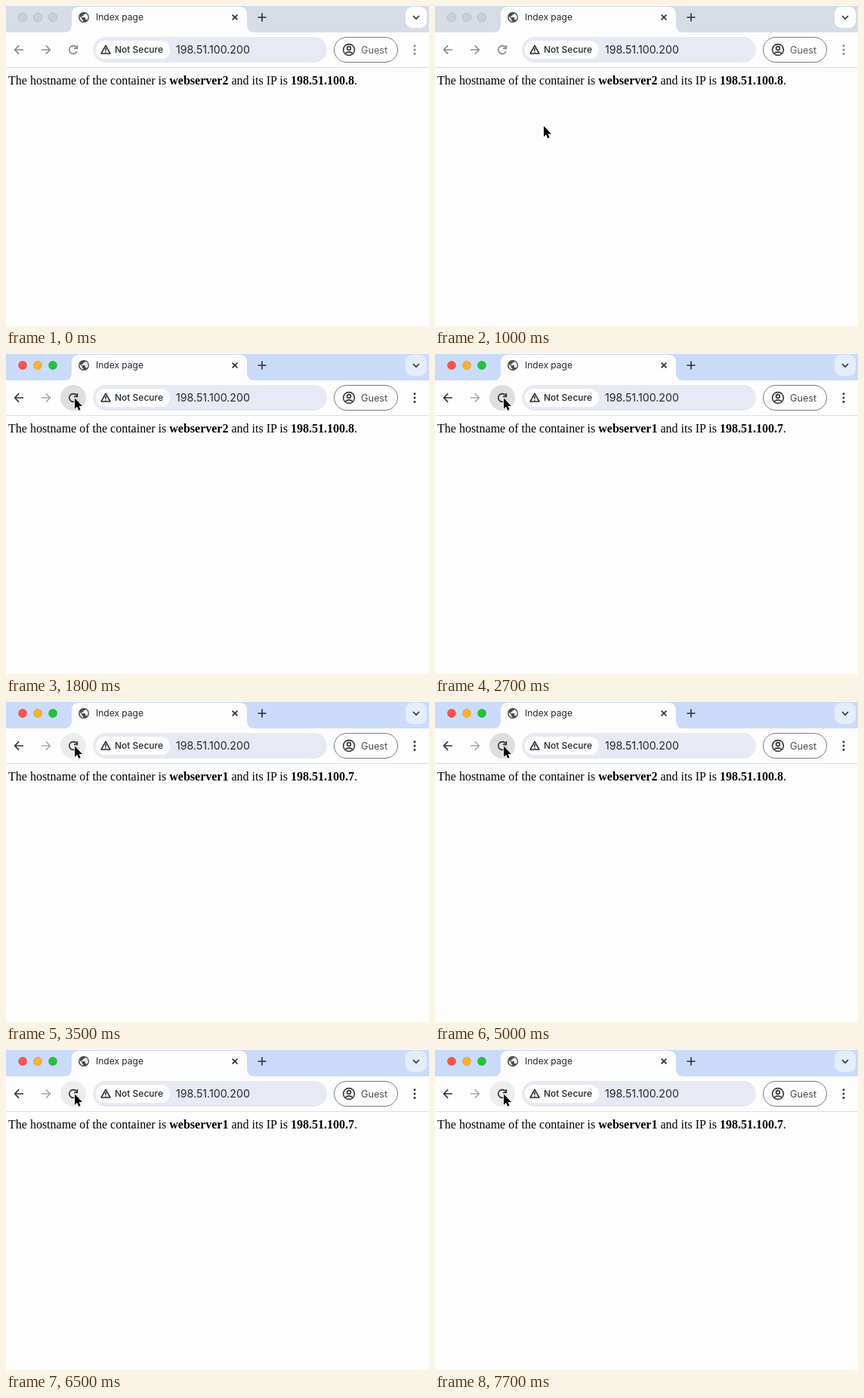
Animation, 560 px wide and 424 px high, one loop 8 s. Source, as an HTML page:

```html
<!DOCTYPE html>
<html lang="en">
<head>
<meta charset="utf-8">
<title>Index page</title>
<style>
  html, body { margin: 0; width: 100%; height: 100%; overflow: hidden; background: #fdfdfd; }
  svg {
    display: block; width: 560px; height: 424px;
    --strip: #d6dde6; --menu: #fefefe; --icon: #85888c; --faded: #8c8f93; --guest: #5b5e62;
    --red: #ccd0d5; --amber: #ccd0d5; --green: #ccd0d5; --rim: #b4b8be;
  }
  svg.active {
    --strip: #cbdcfb; --menu: #e5edfd; --icon: #303337; --faded: #a7a9ac; --guest: #484b4f;
    --red: #ff5148; --amber: #ffb02a; --green: #22c23a; --rim: rgba(0, 0, 0, .12);
  }
  .line { fill: none; stroke-width: 1.6; }
  .icon { stroke: var(--icon); }
  .faded { stroke: var(--faded); }
  .dark { stroke: #2b2e32; }
  .ui { font-family: Inter, Roboto, sans-serif; fill: #24272b; }
  .page { font: 16px "Liberation Serif", "Times New Roman", serif; fill: #000; }
  .bold { font-weight: 700; }
</style>
</head>
<body>
<svg id="stage" viewBox="0 0 560 424">
  <rect width="560" height="424" fill="#fdfdfd"/>

  <!-- Tab strip -->
  <rect width="560" height="35" fill="var(--strip)"/>
  <path d="M77 35Q87 35 87 25V11Q87 1 97 1H309Q319 1 319 11V25Q319 35 329 35Z" fill="#fdfdfd"/>
  <g stroke="var(--rim)" stroke-width=".8">
    <circle cx="22" cy="15" r="5.7" fill="var(--red)"/>
    <circle cx="42" cy="15" r="5.7" fill="var(--amber)"/>
    <circle cx="62" cy="15" r="5.7" fill="var(--green)"/>
  </g>
  <circle cx="103" cy="15" r="7" fill="#4b4e53"/>
  <g fill="#fdfdfd">
    <path d="M97.6 13.6L101 17V18Q101 19.2 102.3 19.3V20.6Q97 19.5 97.6 13.6Z"/>
    <path d="M105 9.8Q108.6 11.6 108.6 15Q108.6 17.2 107.1 18.8Q106.7 17.8 105.6 17.8H105V15.7Q105 15 104.3 15H100.2V13.6H101.6Q102.3 13.6 102.3 12.9V11.5H103.6Q105 11.4 105 9.8Z"/>
  </g>
  <text class="ui" x="119" y="19.2" font-size="12">Index page</text>
  <path class="line dark" d="M299.6 11.6l6.8 6.8m0-6.8l-6.8 6.8"/>
  <path class="line dark" d="M333.5 15h11M339 9.5v11"/>
  <rect x="529" y="1" width="28" height="28" rx="9" fill="var(--menu)"/>
  <path class="line dark" stroke-width="1.8" d="M539 13l4 4 4-4"/>

  <!-- Toolbar -->
  <path d="M0 81.5H560" stroke="#dcdfe4"/>
  <path class="line icon" d="M23 58H12M17.2 52.4L11.6 58l5.6 5.6"/>
  <path class="line faded" d="M47 58H58M52.8 52.4L58.4 58l-5.6 5.6"/>
  <circle id="hover" cx="89" cy="58" r="17"/>
  <path class="line icon" d="M94 60.2A5.4 5.4 0 1 1 93.2 54.5L94.4 56"/>
  <path class="line icon" d="M94.4 52v4.4H90"/>

  <rect x="115" y="41" width="310" height="34" rx="17" fill="#e7eaf5"/>
  <rect x="119" y="46" width="98" height="24" rx="12" fill="#fdfdfd"/>
  <path class="line dark" stroke-width="1.4" stroke-linejoin="round" d="M132 52.3L137.9 63H126.1Z"/>
  <path class="line dark" stroke-width="1.4" d="M132 55.8v3.6m0 1v1.4"/>
  <text class="ui" x="144" y="62.2" font-size="12" font-weight="500">Not Secure</text>
  <text class="ui" x="225" y="63" font-size="14.2">198.51.100.200</text>

  <rect x="434.5" y="41.5" width="84" height="33" rx="16.5" fill="#fdfdfd" stroke="#76797c"/>
  <g class="line" stroke="#34373b" stroke-width="1.5">
    <circle cx="454" cy="58" r="7.4"/>
    <circle cx="454" cy="56" r="2.4"/>
    <path d="M449 63Q454 58.6 459 63"/>
  </g>
  <text class="ui" x="470" y="62.6" font-size="12.7" style="fill: var(--guest)">Guest</text>
  <g fill="var(--icon)">
    <circle cx="541" cy="52.8" r="1.5"/>
    <circle cx="541" cy="58" r="1.5"/>
    <circle cx="541" cy="63.2" r="1.5"/>
  </g>

  <!-- Page -->
  <text class="page" x="3" y="104">The hostname of the container is <tspan class="bold" id="host"></tspan> and its IP is <tspan class="bold" id="address"></tspan>.</text>

  <path id="cursor" d="M0 0V14.2L3.2 11.2 5.3 16.2 7.6 15.2 5.6 10.4H10Z"
        stroke="#fff" stroke-width="1.6" stroke-linejoin="round" paint-order="stroke"/>
</svg>

<script>
  const LOOP = 8000;
  const ACTIVATED = 1800;

  // [time, x, y]: the pointer jumps from place to place.
  const pointerSteps = [
    [700, 205, 279], [900, 179, 223], [1000, 144, 159], [1100, 123, 118], [1200, 107, 88],
    [1300, 97, 66], [1400, 92, 54], [1500, 91, 56], [1600, 91, 58.5]
  ];

  // [button down, page reloaded]: every reload reaches the other server.
  const clicks = [
    [1800, 2100], [2700, 2900], [3300, 3500], [4300, 4400], [5000, 5200],
    [5700, 5900], [6200, 6500], [6900, 7100], [7500, 7700]
  ];

  const servers = [
    { host: "webserver2", address: "198.51.100.8" },
    { host: "webserver1", address: "198.51.100.7" }
  ];

  const byId = id => document.getElementById(id);
  const [stage, hover, cursor, host, address] =
    ["stage", "hover", "cursor", "host", "address"].map(byId);

  function render(t) {
    const active = t >= ACTIVATED;
    const pressed = clicks.some(([down, loaded]) => t >= down && t < loaded);
    const reloads = clicks.filter(([, loaded]) => t >= loaded).length;
    const server = servers[reloads % 2];
    const step = pointerSteps.filter(([time]) => t >= time).pop();

    stage.classList.toggle("active", active);
    hover.setAttribute("fill", !active ? "none" : pressed ? "#dedede" : "#ededed");
    host.textContent = server.host;
    address.textContent = server.address;
    cursor.style.display = step ? "" : "none";
    if (step) cursor.setAttribute("transform", `translate(${step[1]} ${step[2]})`);
  }

  function tick() {
    render(performance.now() % LOOP);
    requestAnimationFrame(tick);
  }
  tick();
</script>
</body>
</html>
```
